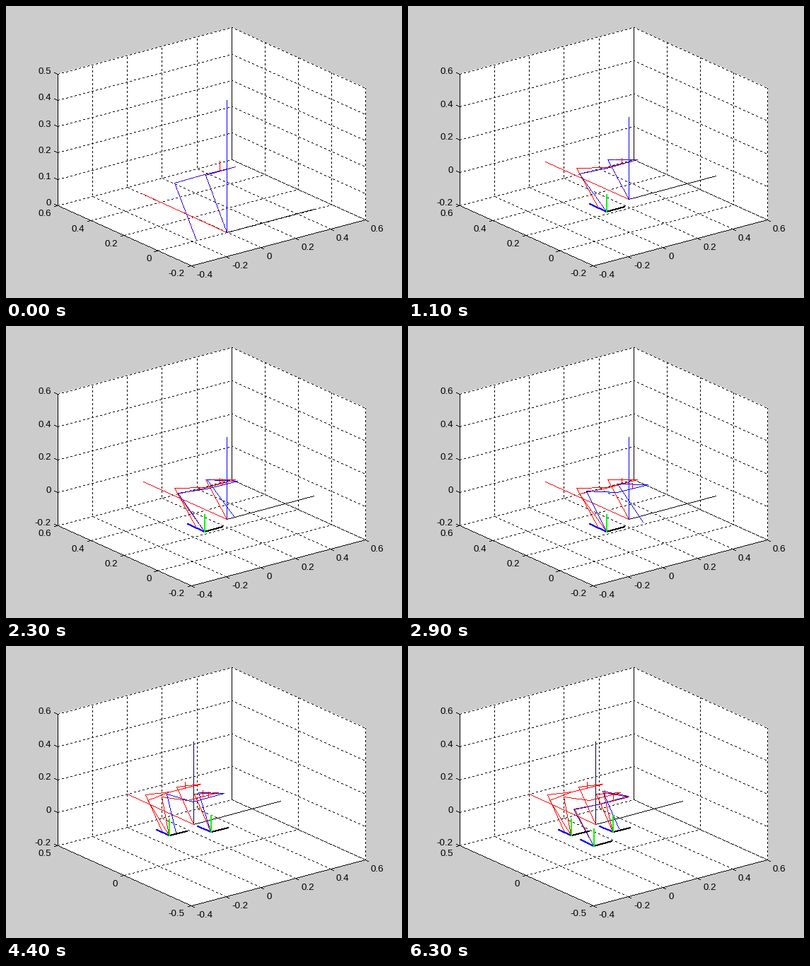
Animation of 560 by 413 pixels, one loop 6.8 s. Source, as a matplotlib script:

```python
import matplotlib.pyplot as plt
import numpy as np
from matplotlib.animation import FuncAnimation

W, H, DPI = 560, 413, 112
PX = 72 / DPI
RED, BLUE, GREEN, BLACK = "#ff0000", "#0000ff", "#00ff00", "#000000"

# Screen corner and edge vectors of the plot box
CORNER = np.array([261.7, 366.9])
EDGES = np.array([[246.0, -65.1], [-188.9, -85.1], [0.0, -186.2]])
DATA_SHIFT = np.array([-0.5, 0.0])

SHIN, THIGH, HIP_GAP, MARK = 0.222, 0.199, 0.178, 0.035
LIFT, EASE = 0.035, 1.7

# leg, first tick, last tick, y at lift-off, y at landing
STEPS = [
    (0, 0, 6, 0.0, -0.048),
    (1, 7, 30, 0.0, -0.125),
    (0, 31, 49, -0.048, -0.2165),
    (1, 50, 69, -0.125, -0.290),
]
LEG_X = (-HIP_GAP, 0.0)

HIP_T = [0, 14, 19, 21, 25, 28, 30, 31, 35, 36, 40, 49, 59]
HIP_Y = [-.05, -.051, -.063, -.075, -.112, -.147, -.1856, -.1856, -.197, -.201, -.225, -.249, -.245]
LIFT_T, HIP_Z = [0, 31, 40, 49, 59], [.264, .262, .270, .259, .259]

plt.rcParams.update({"font.family": "Liberation Sans", "path.simplify": False})
fig = plt.figure(figsize=(W / DPI, H / DPI), dpi=DPI, facecolor="#cccccc")
ax = fig.add_axes([0, 0, 1, 1])


class View:
    """Fixed-angle projection with its own limits and ticks."""

    def __init__(self, tick):
        x = np.linspace(-0.4, 0.6, 6)
        y = np.linspace(-0.2, 0.6, 5) if tick < 36 else np.linspace(-0.5, 0.5, 3)
        z = np.linspace(0, 0.5, 6) if tick < 6 else np.linspace(-0.2, 0.6, 5)
        self.ticks = (x, y, z)
        self.low = np.array([t[0] for t in self.ticks])
        self.span = np.array([t[-1] - t[0] for t in self.ticks])

    def __call__(self, points):
        unit = (np.asarray(points) - self.low) / self.span
        return CORNER + DATA_SHIFT + unit @ EDGES


def stairs(a, b):
    """Whole pixels along a segment, one per step of its longer side."""
    n = max(int(np.abs(b - a).max()), 1)
    t = np.arange(n + 1)[:, None] / n
    return np.floor(a + t * (b - a) + 0.5)


def line(pts, color, width=1, dash=None):
    """Hard-edged polyline drawn with a square pen."""
    pts = np.floor(np.asarray(pts) + 0.5)
    dots = np.vstack([stairs(a, b) for a, b in zip(pts, pts[1:])])
    if dash:
        on, off = dash
        dots = dots[np.arange(len(dots)) % (on + off) < on]
    x, y = dots.T
    xs = np.column_stack([x, x + width, np.full(len(x), np.nan)]).ravel()
    ax.plot(xs, np.repeat(y + width / 2, 3), color=color, lw=width * PX,
            solid_capstyle="butt", snap=False)


def label(x, y, value, align):
    text = f"{round(value, 1) + 0.0:g}"
    ax.text(x, y, text, fontsize=13.33 * PX, ha=align, va="center_baseline")


def draw_box(view):
    ex, ey, ez = EDGES
    left, right, back = CORNER + ey, CORNER + ex, CORNER + ex + ey
    outline = [CORNER, left, left + ez, back + ez, right + ez, right]
    ax.fill(*np.array(outline).T + 0.5, color="white", lw=0, antialiased=False)

    def grid(*pts):
        line(pts, BLACK, dash=(3, 3))

    fx, fy, fz = [(t - t[0]) / (t[-1] - t[0]) for t in view.ticks]
    for f in fx:
        grid(CORNER + f * ex, left + f * ex, left + f * ex + ez)
    for f in fy:
        grid(CORNER + f * ey, right + f * ey, right + f * ey + ez)
    for f in fz:
        grid(left + f * ez, back + f * ez, right + f * ez)
    line([left + ez, left, CORNER, right], BLACK)

    marks = [
        (CORNER, ex, fx, (4, 2), (8, 13), "left"),
        (CORNER, ey, fy, (-5, 1), (-9, 11), "right"),
        (left, ez, fz, (-5, -2), (-9, -4), "right"),
    ]
    for (base, edge, fracs, stub, shift, align), values in zip(marks, view.ticks):
        for f, value in zip(fracs, values):
            p = base + f * edge
            line([p, p + stub], BLACK)
            label(*(p + shift), value, align)


def draw_axes(view, origin, size, colors, width=1):
    for axis, color in zip(np.eye(3), colors):
        line(view([origin, origin + size * axis]), color, width)


def foot(leg, tick):
    y = z = 0.0
    for who, start, end, y0, y1 in STEPS:
        if who == leg and tick > start:
            s = min((tick - start) / (end - start), 1)
            y = y0 + (y1 - y0) * s ** EASE
            z = LIFT * np.sin(np.pi * s)
    return np.array([LEG_X[leg], y, z])


def knee(ankle, hip):
    d = hip[1:] - ankle[1:]
    dist = np.hypot(*d)
    u = d / dist
    along = (SHIN**2 + dist**2 - THIGH**2) / (2 * dist)
    out = np.sqrt(max(SHIN**2 - along**2, 0))
    y, z = ankle[1:] + along * u + out * np.array([u[1], -u[0]])
    return np.array([ankle[0], y, z])


def pose(tick):
    """Chain foot-knee-hip-hip-knee-foot."""
    y, z = np.interp(tick, HIP_T, HIP_Y), np.interp(tick, LIFT_T, HIP_Z)
    feet = [foot(leg, tick) for leg in (0, 1)]
    hips = [np.array([x, y, z]) for x in LEG_X]
    knees = [knee(f, h) for f, h in zip(feet, hips)]
    return np.array([feet[0], knees[0], hips[0], hips[1], knees[1], feet[1]])


def draw_robot(view, joints, color):
    line(view(joints), color)
    mid = (joints[2] + joints[3]) / 2
    line(view([mid, mid + [0, 0, MARK]]), RED)


def draw(frame):
    tick = min(max(frame - 4, 0), 59)
    ax.cla()
    ax.set(xlim=(0, W), ylim=(H, 0))
    ax.axis("off")

    view = View(tick)
    draw_box(view)
    upright = BLUE if tick < 36 else "#000040"
    draw_axes(view, np.zeros(3), 0.5, (BLACK, RED, upright))

    landed = [s for s in STEPS if tick > s[2]]
    traces = [pose(0)] + [pose(s[2]) for s in landed]
    for joints in traces:
        draw_robot(view, joints, RED)
    draw_robot(view, pose(tick), BLUE)
    line(view(traces[-1]), RED, dash=(2, 8))
    for leg, _, end, _, _ in landed:
        draw_axes(view, foot(leg, end), 0.1, (BLACK, BLUE, GREEN), 2)
    return []


anim = FuncAnimation(fig, draw, frames=68, interval=100, repeat=True,
                     repeat_delay=0, init_func=lambda: draw(0), blit=False)
plt.show()
```
